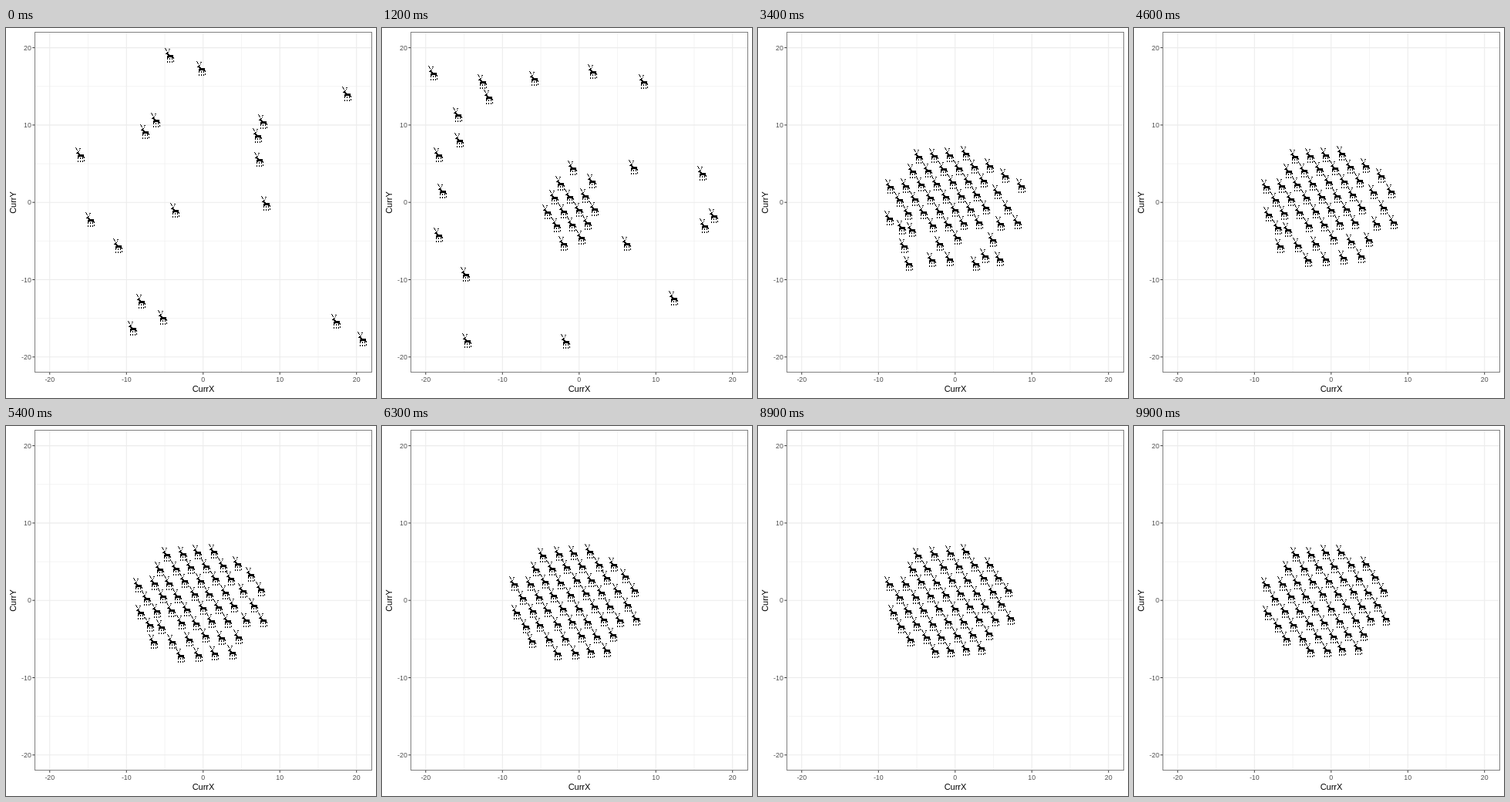
An HTML page for the animation above (10000 ms loop, 480x480 px).

```html
<!DOCTYPE html>
<html lang="en">
<head>
<meta charset="utf-8">
<title>Herd</title>
<style>
html, body { margin: 0; width: 100%; height: 100%; overflow: hidden; background: #fff; }
svg { display: block; }
text { font: 8.8px "Liberation Sans", Arial, sans-serif; fill: #4d4d4d; text-anchor: middle; }
text.title { font-size: 11px; fill: #000; }
text.left { text-anchor: end; }
</style>
</head>
<body>
<svg width="480" height="480" viewBox="0 0 480 480">
  <defs>
    <g id="deer" fill="none" stroke="#000" shape-rendering="crispEdges">
      <path fill="#000" stroke="none" d="M-5-2V-3L-3-4L-1-3L0-1H4L5 0V3H3V2H-1V3H-3V0L-2-1Z"/>
      <path stroke-dasharray="1 1" d="M-2.500-4L-4.500-8L-6.500-11M-1.500-4L-.5-7L.5-10"/>
      <path stroke-dasharray="2 1.500" d="M-2.500 3V10M.5 3V9M3.500 3V10M5.500 2V8"/>
    </g>
  </defs>
  <g id="axes"></g>
  <rect x="37.5" y="5.5" width="437" height="441" fill="none" stroke="#7f7f7f"/>
  <text class="title" x="256" y="472">CurrX</text>
  <text class="title" transform="translate(13 226.500) rotate(-90)">CurrY</text>
  <g id="herd"></g>
</svg>
<script>
const make = (parent, tag, attrs, text = '') => {
  const el = document.createElementNS('http://www.w3.org/2000/svg', tag);
  for (const key in attrs) el.setAttribute(key, attrs[key]);
  el.textContent = text;
  return document.getElementById(parent).appendChild(el);
};
const line = (d, stroke, width = 1) => make('axes', 'path', { d, stroke, 'stroke-width': width });

// Grid, ticks and labels; minor lines go under the major ones
for (const v of [-15, -5, 5, 15, -20, -10, 0, 10, 20]) {
  const major = v % 10 === 0;
  const x = 255.75 + 9.95 * v, y = 226.2 - 10.03 * v;
  line(`M${x} 6V446M38 ${y}H474`, '#ebebeb', major ? 1.07 : 0.53);
  if (!major) continue;
  line(`M${x} 447v2.700M37 ${y}h-2.700`, '#333');
  make('axes', 'text', { x, y: 459 }, v);
  make('axes', 'text', { x: 32.8, y: Math.round(y + 3.2), class: 'left' }, v);
}

const center = [255.5, 226], pace = 12.5, meet = 22;
const gap = (a, b) => Math.hypot(a[0] - b[0], a[1] - b[1]);
const toward = (a, b, k) => a.map((v, n) => v + (b[n] - v) * k);
const clamp = v => Math.min(1, Math.max(0, v));

// Resting places: the cells of a slanted lattice that fall inside an ellipse
const herd = [];
for (let j = -3; j <= 4; j++) {
  for (let i = -5; i <= 4; i++) {
    const slot = [243 + 20.1 * i + 11.6 * j, 219 - 1.4 * i + 17.2 * j];
    const dx = slot[0] - 249, dy = slot[1] - 226;
    if (Math.hypot(dx / 82, dy / 72) < 1) herd.push({ slot });
  }
}

// Key points seen at the start, and those still on the way at the meeting step
const early = [
  [212, 36], [253, 53], [442, 86], [333, 122], [326, 140], [328, 171], [194, 120], [180, 135], [96, 165],
  [219, 237], [109, 249], [145, 283], [337, 228], [175, 355], [203, 376], [164, 390], [428, 381]];
const late = [
  [232, 41], [276, 41], [295, 75], [359, 70], [448, 111], [393, 140], [219, 122], [139, 161], [86, 183],
  [448, 241], [392, 301], [309, 306], [410, 355], [398, 391], [430, 385], [165, 321], [111, 346],
  [67, 356], [193, 392], [111, 422]];

// Each point takes the free slot nearest to its aim
function claim(point, aim, extra) {
  const free = herd.filter(deer => !deer.from);
  if (!free.length) return;
  const deer = free.reduce((a, b) => gap(a.slot, aim) <= gap(b.slot, aim) ? a : b);
  deer.from = point;
  deer.length = gap(point, deer.slot) + extra;
}
late.forEach(p => claim(p, p, pace * meet));
early.forEach(p => claim(p, toward(center, p, 0.15), 0));

for (const deer of herd) {
  const [dx, dy] = deer.slot.map((v, n) => v - center[n]);
  // The rest come from outside the panel, straight outward from their slot
  if (!deer.from) {
    deer.from = toward(center, deer.slot, 2);
    deer.length = pace * meet;
  }
  // The lower right edge stays loose for a while
  deer.slack = Math.hypot(dx, dy) > 48 && dx + 1.8 * dy > 0 ? 0.14 : 0;
  deer.el = make('herd', 'use', { href: '#deer' });
}

function place({ slot, from, length, slack }, i, step) {
  const left = Math.max(0, length - pace * step);
  const home = toward(center, slot, 1 + slack * clamp((72 - step) / 26));
  const sway = step > 46 ? 0.8 : 0;
  const [x, y] = toward(home, from, left / gap(slot, from));
  return [x + sway * Math.sin(2.1 * step + i * i), y + sway * Math.sin(1.7 * step + 3 * i)];
}

function draw() {
  const step = Math.floor(performance.now() / 100) % 100;
  herd.forEach((deer, i) => {
    const [x, y] = place(deer, i, step).map(Math.round);
    const inside = x > 38 && x < 474 && y > 6 && y < 446;
    deer.el.setAttribute('visibility', inside ? 'visible' : 'hidden');
    deer.el.setAttribute('transform', `translate(${x} ${y})`);
  });
  requestAnimationFrame(draw);
}
draw();
</script>
</body>
</html>
```
